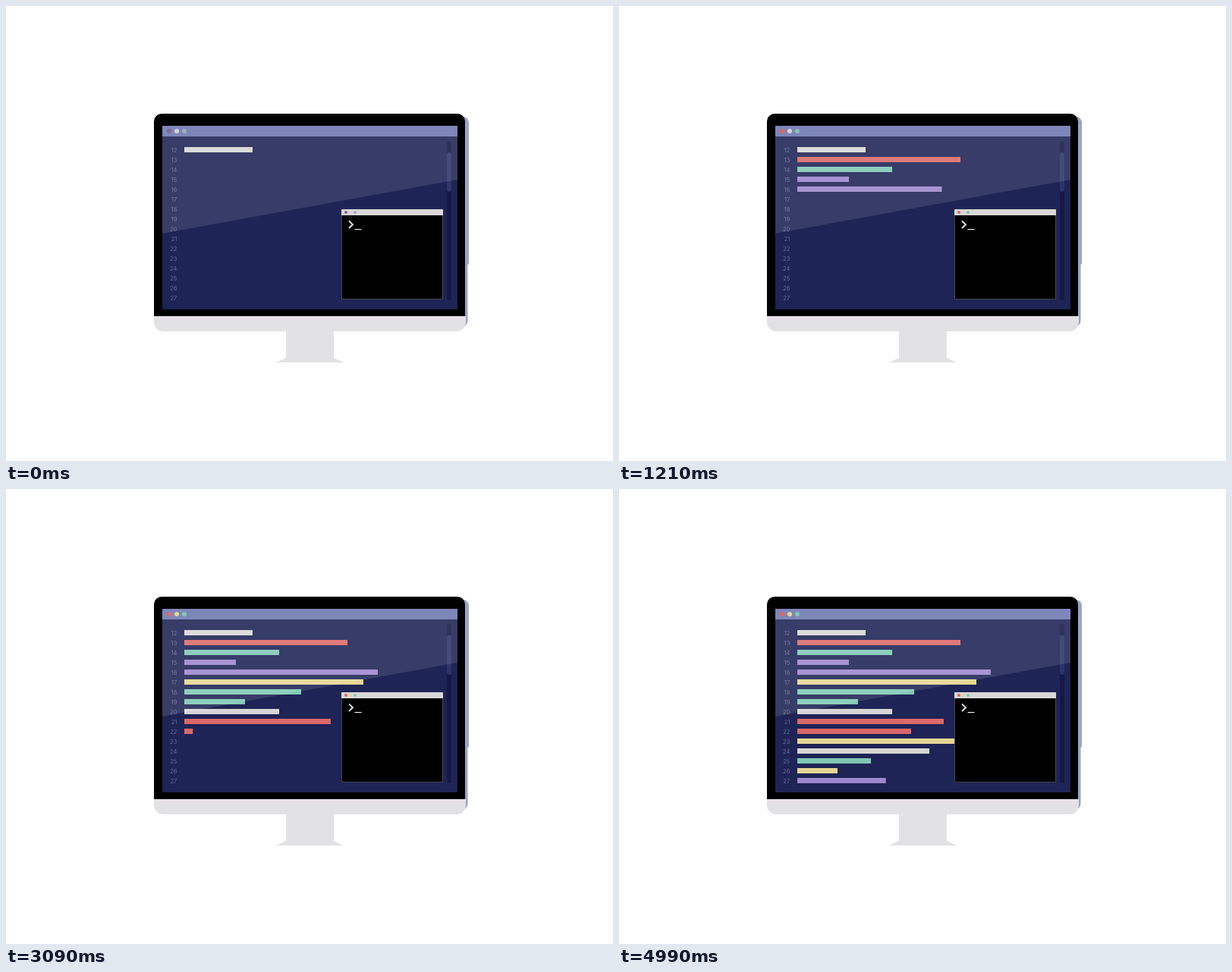
Write an HTML page with a canvas that moves like this. It is 800 px wide and 600 px high and loops after 5090 ms.

```html
<!DOCTYPE html>
<html lang="en">
<head>
<meta charset="utf-8">
<title>Code editor</title>
<style>
html, body { margin: 0; width: 100%; height: 100%; overflow: hidden; background: #fff; }
canvas { display: block; width: 800px; height: 600px; }
</style>
</head>
<body>
<canvas id="stage" width="800" height="600"></canvas>
<script>
const ctx = document.getElementById('stage').getContext('2d');
const LOOP = 5090;
const FIRST_NUMBER = 12, ROW = 13;
const STAND = '#e2e2e4', EDGE = '#9ca3c6', PROMPT = '#e9f3f7';
const inks = { w: '#d7d6d5', r: '#dc6868', g: '#80c8b5', p: '#9e87ce', y: '#e6d692' };

// Code lines in typing order: ink letter and length. The first is already there.
const lines = 'w90 r215 g125 p68 p255 y236 g154 g80 w125 r193 r150 y226 w174 g97 y53 p118'
  .split(' ')
  .map(line => ({ ink: line[0], length: Number(line.slice(1)) }));

// The picture updates in short steps at first, then every 100 ms.
const snap = t => t < 1790 ? Math.floor(t / 57) * 57 : 1790 + Math.floor((t - 1790) / 100) * 100;

// Typing runs at half a pixel per ms and slows down after two seconds.
const typedAt = t => lines[0].length + 0.5 * t - 0.076 * Math.max(0, t - 2000);

function rect(x, y, w, h, color) {
  ctx.fillStyle = color;
  ctx.fillRect(x, y, w, h);
}

function round(x, y, w, h, radii, color) {
  ctx.fillStyle = color;
  ctx.beginPath();
  ctx.roundRect(x, y, w, h, radii);
  ctx.fill();
}

function poly(points, color) {
  ctx.fillStyle = color;
  ctx.beginPath();
  points.forEach(([x, y]) => ctx.lineTo(x, y));
  ctx.fill();
}

function dot(x, y, r, color) {
  ctx.fillStyle = color;
  ctx.beginPath();
  ctx.arc(x, y, r, 0, Math.PI * 2);
  ctx.fill();
}

function drawMonitor() {
  round(590, 146, 20, 195, [0, 8, 2, 0], EDGE);
  round(590, 330, 18.5, 93, [0, 0, 8, 0], EDGE);
  round(195, 142, 410, 267, [10, 10, 0, 0], '#000');
  round(195, 409, 411, 20, [0, 0, 12, 12], STAND);
  rect(195, 409, 411, 6, '#e6e1e5');
  rect(369, 429, 63, 36, STAND);
  poly([[369, 464], [432, 464], [445, 470], [356, 470]], STAND);
}

function drawEditor(typed) {
  rect(206, 158, 389, 242, '#1e2455');
  round(581, 178, 6, 210, 3, '#151945');
  round(581, 193, 6, 52, 3, '#2d3468');

  ctx.font = '7.5px Inter, sans-serif';
  ctx.textAlign = 'right';
  let left = typed;
  lines.forEach(({ ink, length }, i) => {
    const y = 186 + i * ROW;
    ctx.fillStyle = '#686d9e';
    ctx.fillText(FIRST_NUMBER + i, 225.3, y + 7);
    rect(235, y, Math.max(0, Math.min(length, left)), 7, inks[ink]);
    left -= length;
  });

  poly([[206, 172], [595, 172], [595, 229], [206, 300]], 'rgba(255,255,255,0.11)');
  rect(206, 158, 389, 14, '#7f86ba');
}

function drawTerminal() {
  rect(442, 268, 134, 119, '#45464e');
  rect(443, 276, 132, 110, '#000');
  round(442, 268, 134, 8, [1, 1, 0, 0], '#d9d7d7');
  ctx.strokeStyle = PROMPT;
  ctx.lineWidth = 1.8;
  ctx.beginPath();
  ctx.moveTo(452, 283.5);
  ctx.lineTo(457, 288.2);
  ctx.lineTo(452, 293);
  ctx.stroke();
  rect(459.5, 294, 9, 1.2, PROMPT);
}

// A window button takes on its ink once a line of that ink has begun.
function drawButtons(typed) {
  const begun = new Set();
  let start = 0;
  for (const { ink, length } of lines) {
    if (start < typed) begun.add(ink);
    start += length;
  }
  const buttons = [['r', '#84688f'], ['y', inks.w], ['g', '#a3adc2']];
  buttons.forEach(([ink, idle], i) => {
    const color = begun.has(ink) ? inks[ink] : idle;
    dot(215 + i * 10, 165, 3, color);
    dot(448 + i * 6, 272, 2, color);
  });
}

function draw(now) {
  const typed = typedAt(snap(now % LOOP));
  rect(0, 0, 800, 600, '#fff');
  drawMonitor();
  drawEditor(typed);
  drawTerminal();
  drawButtons(typed);
}

let begin;
function frame(now) {
  begin ??= now;
  draw(Math.max(0, now - begin));
  requestAnimationFrame(frame);
}
draw(0);
requestAnimationFrame(frame);
</script>
</body>
</html>
```
